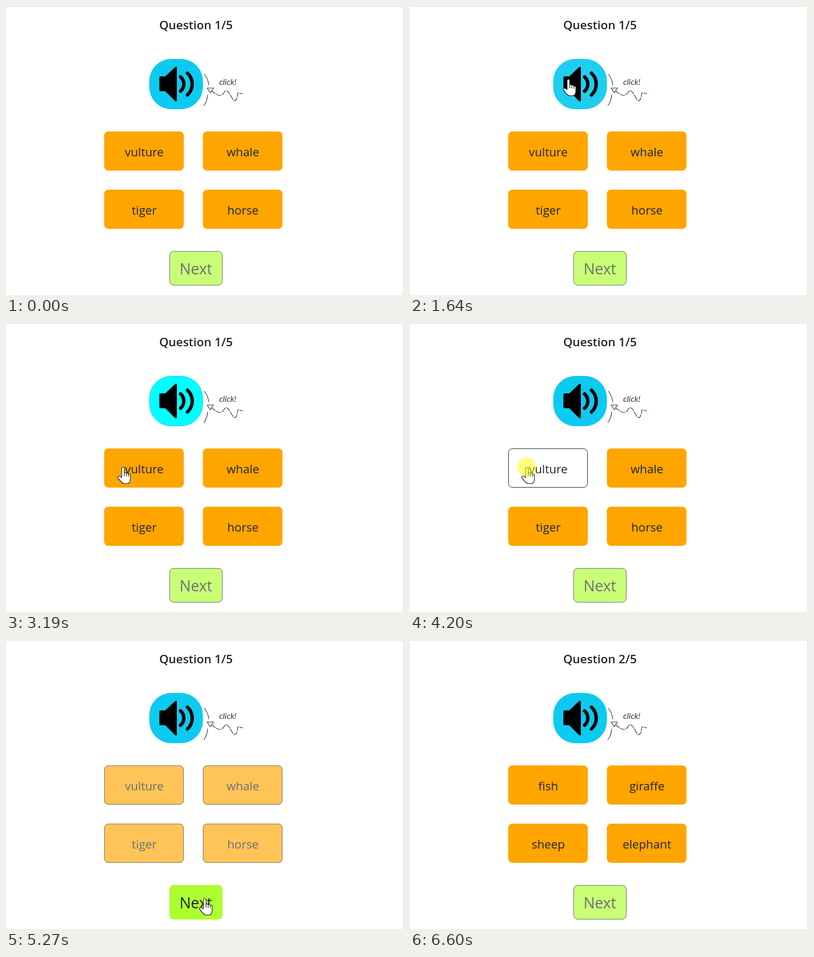
These frames come from a looping animation (750 px wide and 546 px high, 7200 ms). An HTML page:

```html
<!DOCTYPE html>
<html lang="en">
<head>
<meta charset="utf-8">
<title>Animal sound quiz</title>
<style>
  html, body { margin: 0; width: 100%; height: 100%; overflow: hidden; background: #fff; }
  svg { display: block; width: 100%; height: 100%; }
  text { font-family: "Open Sans", "Noto Sans", sans-serif; fill: #212529; text-anchor: middle; font-variant-ligatures: none; }
  .label { font-size: 22.2px; }
  .title { font-size: 22.4px; font-weight: 600; }
  .next { font-size: 28.4px; }
  .hint { font: italic 15.5px Lato, sans-serif; fill: #26352b; }
  .sketch { fill: none; stroke: #26352b; stroke-width: 1.2; stroke-linecap: round; stroke-linejoin: round; }
  .wave { fill: none; stroke: #000; stroke-width: 6.4; stroke-linecap: round; }
  .pointer path { fill: #fff; stroke: #14212b; stroke-width: 1.2; stroke-linejoin: round; stroke-linecap: round; }
</style>
</head>
<body>
<svg viewBox="0 0 750 546">
  <path d="M0 .5H749.5V546" fill="none" stroke="#dedede"/>
  <text id="title" class="title" x="358" y="44"></text>

  <rect id="speaker" x="270.5" y="100.5" width="100" height="94" rx="41" stroke="#0dcaf0"/>
  <path d="M291 133H300L318 116Q322 113 322 117V178Q322 182 318 179L300 161H291Q289 161 289 159V135Q289 133 291 133Z"/>
  <path class="wave" d="M329 134A18 18 0 0 1 329 161M342 127A28 28 0 0 1 342 168"/>

  <g class="sketch">
    <path d="M374 129Q381 138 382 149M380 168Q379 180 373 188"/>
    <path stroke-dasharray="9 2.5" d="M387 160Q398 169 403 169T412 162T425 172T437 164L446 166"/>
    <path fill="#fff" d="M379 155H391L385 164Z"/>
  </g>
  <text class="hint" x="418" y="149">click!</text>

  <g id="buttons"></g>

  <g id="cursor" class="pointer">
    <path id="arrow" d="M.5 .5V24L6 19L10 28L13.5 26.5L9.8 17.8H17Z"/>
    <g id="hand">
      <path d="M-2 20V3Q-2 .5 .5 .5T3 3V11Q5.5 9.5 7 12Q9.5 10.8 11 13.3Q14.5 12.5 14.5 16V22Q14.5 31.5 8 31.5H3Q0 31.5 -3 28L-8.5 21.5Q-10.5 18.5 -8 17.5Q-5 17 -2 20Z"/>
      <path d="M3 11V17M7 12V17.5M11 13.5V18"/>
    </g>
    <circle id="glow" r="18" fill="#ff0" fill-opacity=".5"/>
  </g>
</svg>
<script>
const LOOP = 7200, STEP = 67, FADE = 150, GLOW = 270;
const PLAY = 2040, PICK = 4070, NEXT = 5800;
const LOCK = PICK + 160, SWAP = NEXT + 130, LEAVE = 6600;

const WHITE = [255, 255, 255], ORANGE = [255, 165, 0], LIME = [173, 255, 47];
const INFO = [13, 202, 240], HOVER = [49, 210, 242], AQUA = [0, 255, 255];

const questions = [
  ["Question 1/5", "vulture", "whale", "tiger", "horse"],
  ["Question 2/5", "fish", "giraffe", "sheep", "elephant"]
];

// The pointer's stops; bend pushes the path sideways by a share of its length.
const entry = { x: 680, y: 530 };
const moves = [
  { start: 530, end: 1100, x: 555, y: 156, bend: .05 },
  { start: 1430, end: 1640, x: 298, y: 138, bend: .04 },
  { start: 2380, end: 2720, x: 233, y: 196, bend: 0 },
  { start: 2790, end: 3190, x: 220, y: 272, bend: .85 },
  { start: 4720, end: 5270, x: 374, y: 488, bend: -.32 },
  { start: 6270, end: LEAVE, x: 715, y: 545, bend: -.04 }
];

const $ = id => document.getElementById(id);
const mix = (a, b, k) => a.map((v, i) => v + (b[i] - v) * k);
const rgb = c => `rgb(${c.map(Math.round)})`;
const show = (el, on) => el.setAttribute("visibility", on ? "visible" : "hidden");
const ramp = (t, start, time = FADE) => Math.min(1, Math.max(0, (t - start) / time));
const during = (t, from, to, out = FADE) => ramp(t, from) - ramp(t, to, out);
const press = (t, click) => ramp(t, click, 120) - ramp(t, click + 180, 140);

function add(parent, tag, attrs) {
  const el = document.createElementNS("http://www.w3.org/2000/svg", tag);
  for (const name in attrs) el.setAttribute(name, attrs[name]);
  return parent.appendChild(el);
}

const inside = (x, y, w, h) => (px, py) => px >= x && px <= x + w && py >= y && py <= y + h;
const onSpeaker = inside(270, 100, 101, 95);

function makeButton(x, y, width, height, color, style, textX, textY) {
  const group = add($("buttons"), "g", {});
  const box = add(group, "rect", { x, y, width, height, rx: 8 });
  const edge = add(group, "rect", {
    x: x + .5, y: y + .5, width: width - 1, height: height - 1, rx: 7.5, fill: "none", stroke: "#212529"
  });
  const label = add(group, "text", { class: style, x: x + textX, y: y + textY });
  return {
    hit: inside(x, y, width, height),
    paint(text, off, pressed) {
      label.textContent = text;
      group.setAttribute("opacity", 1 - .35 * off);
      box.setAttribute("fill", rgb(mix(color, WHITE, pressed)));
      edge.setAttribute("stroke-opacity", Math.max(off, pressed));
    }
  };
}

const answers = [0, 1, 2, 3].map(i =>
  makeButton(185 + 186 * (i % 2), 237 + 110 * (i >> 1), 150, 74, ORANGE, "label", 75.5, 47));
const next = makeButton(308, 463, 100, 65, LIME, "next", 49.8, 44);

function cursorAt(t) {
  const i = moves.findLastIndex(m => m.start <= t);
  if (i < 0 || t >= LEAVE) return null;
  const a = moves[i - 1] || entry, b = moves[i];
  const step = (Math.floor((t - b.start) / STEP) + 1) * STEP;
  const p = t >= b.end ? 1 : Math.min(1, step / (b.end - b.start + STEP));
  const k = p * p * (3 - 2 * p);
  const dx = b.x - a.x, dy = b.y - a.y;
  const sway = 2 * k * (1 - k) * b.bend;
  return [a.x + dx * k - dy * sway, a.y + dy * k + dx * sway];
}

function render(t) {
  const [title, ...names] = questions[t < SWAP ? 0 : 1];
  const off = during(t, LOCK, SWAP);
  const nextOff = 1 - off;

  $("title").textContent = title;
  const idle = mix(INFO, HOVER, during(t, 1570, 2450));
  $("speaker").setAttribute("fill", rgb(mix(idle, AQUA, during(t, PLAY + 60, 3530, 280))));
  answers.forEach((button, i) => button.paint(names[i], off, i ? 0 : press(t, PICK)));
  next.paint("Next", nextOff, press(t, NEXT));

  const pos = cursorAt(t);
  $("cursor").style.display = pos ? "" : "none";
  if (!pos) return;
  const active = onSpeaker(...pos)
    || off < .5 && answers.some(b => b.hit(...pos))
    || nextOff < .5 && next.hit(...pos);
  $("cursor").setAttribute("transform", `translate(${pos})`);
  show($("hand"), active);
  show($("arrow"), !active);
  show($("glow"), [PLAY, PICK, NEXT].some(c => t >= c && t < c + GLOW));
}

const start = performance.now();
function tick() {
  render((performance.now() - start) % LOOP);
  requestAnimationFrame(tick);
}
tick();
</script>
</body>
</html>
```
